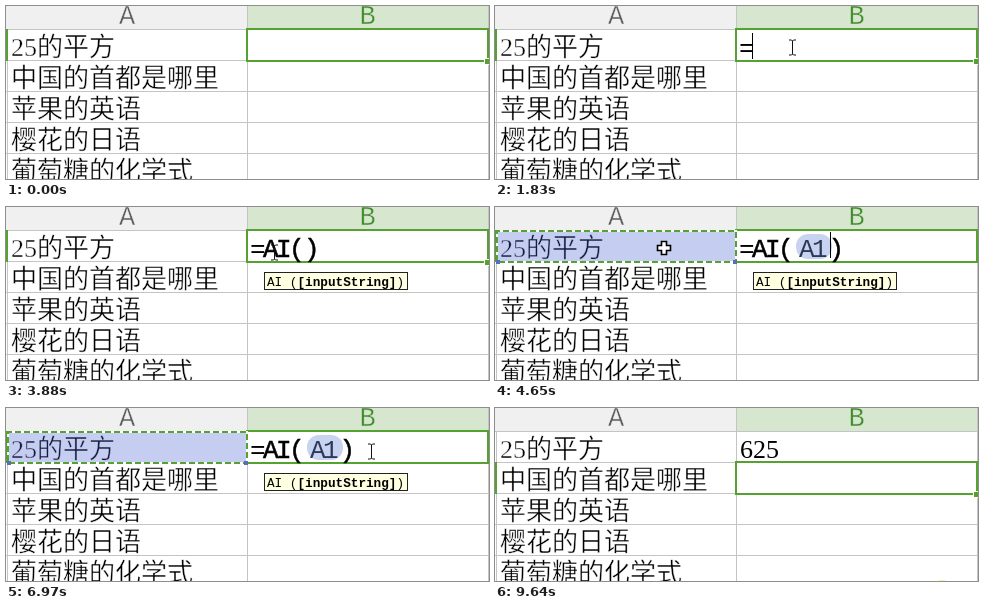
An HTML page that plays this animation: 483x173 px, repeating every 9.79 s.

```html
<!DOCTYPE html>
<html lang="zh-CN">
<head>
<meta charset="utf-8">
<title>表格 AI 函数</title>
<style>
  html, body { margin: 0; width: 100%; height: 100%; overflow: hidden; background: #fff; }
  svg { display: block; width: 483px; height: 173px; }
  text { white-space: pre; }
  .cell { font: 300 26px "Liberation Serif", "Noto Sans CJK SC", serif; fill: #000; }
  .thin { stroke: #fff; stroke-width: .45px; }
  .head { font: 27px "Liberation Mono", monospace; text-anchor: middle; stroke-width: .5px; }
  .code { font: 26px "Liberation Mono", monospace; letter-spacing: -2.6px; fill: #000; }
  .bold { stroke: #000; stroke-width: .5px; }
  .ref { fill: #2e3858; }
  .fx { font: italic bold 16px "Liberation Serif", serif; fill: #44546a; }
  .item { font: 14px "Liberation Mono", monospace; fill: #222; }
  .note { font: 12.2px "Open Sans", "Noto Sans CJK SC", sans-serif; fill: #111; }
  .hint { font: 12.7px "Liberation Mono", monospace; fill: #000; }
  .grid { stroke: #c4c4c4; fill: none; }
  .pick { stroke: #56a230; stroke-width: 2; fill: none; }
  .panel { fill: #fff; stroke: #b4b4b4; }
  .soft { filter: drop-shadow(1px 1px 2px #0005); }
  .caret { fill: #000; }
</style>
</head>
<body>
<svg viewBox="0 0 483 173">
  <rect width="483" height="173" fill="#fff"/>
  <rect width="241" height="23" fill="#f0f0f0"/>
  <rect x="241" width="242" height="23" fill="#d7e6cf"/>
  <text class="head" x="121" y="18" fill="#5c5c5c" stroke="#f0f0f0">A</text>
  <text class="head" x="361.5" y="18" fill="#3f8c2b" stroke="#d7e6cf">B</text>

  <g id="rows" class="cell thin"></g>
  <rect data-on="4330-8380" x="2" y="24" width="239" height="31" fill="#3f5fcd" fill-opacity=".3"/>
  <path class="grid" d="M0 23.5H483M0 54.5H483M0 85.5H483M0 116.5H483M0 147.5H483M241.5 0V173M482.5 0V173M1.5 24V173"/>

  <g id="box">
    <path class="pick" d="M1 23V55"/>
    <rect class="pick" x="241" y="23" width="241" height="32"/>
    <rect id="grip" x="478.5" y="52.5" width="6" height="6" fill="#56a230" stroke="#fff"/>
  </g>

  <g data-on="4330-8380">
    <rect x="2" y="24" width="239" height="31" fill="none" stroke="#fff" stroke-width="2"/>
    <rect id="ants" class="pick" x="2" y="24" width="239" height="31" stroke-dasharray="6 3"/>
    <path d="M1 53h4v4h-4zM238 53h4v4h-4z" fill="#5470b8"/>
  </g>

  <text class="code" data-on="1830-8380" x="244" y="50">=</text>
  <text class="code bold" data-on="2130-2280" x="257" y="50">a</text>
  <text class="code bold" data-on="2280-2780" x="257" y="50">ai</text>
  <text class="code bold" data-on="2780-8380" x="257" y="50">AI(</text>
  <text class="code bold" data-on="2780-4330" x="298" y="50">)</text>
  <g data-on="4330-8380">
    <rect x="301" y="27" width="36" height="25" rx="12" fill="#c8d2f1"/>
    <text class="code ref" x="304" y="50">A1</text>
    <text class="code bold" x="333.5" y="50">)</text>
  </g>
  <text class="cell" data-on="8380-9790" x="245" y="50">625</text>

  <g class="caret">
    <rect data-on="880-1350" x="244" y="28" width="1" height="25"/>
    <rect data-on="1830-2130" x="257" y="27" width="1" height="26"/>
    <rect data-on="2130-2280" x="271" y="27" width="1" height="26"/>
    <rect data-on="2280-2780" x="284" y="27" width="1" height="26"/>
    <rect data-on="2780-3250" x="299" y="27" width="1" height="26"/>
    <rect data-on="4330-4960" x="335" y="25" width="1" height="26"/>
  </g>

  <g data-on="2130-2280">
    <rect class="panel soft" x="258.5" y="55.5" width="116" height="130"/>
    <rect x="259" y="56" width="115" height="31" fill="#dfecd8"/>
    <g id="list"></g>
    <rect class="panel" x="377.5" y="56.5" width="130" height="30" rx="1"/>
    <text class="note" x="386" y="76">返回给定数字的绝对值</text>
  </g>

  <g data-on="2280-2780">
    <rect class="soft" x="258" y="55" width="68" height="33" fill="#dfecd8"/>
    <text class="fx" x="267" y="77">fx</text>
    <text class="item" x="291" y="78">AI</text>
    <rect class="panel" x="329.5" y="56.5" width="119" height="31" rx="1"/>
    <text class="note" x="340" y="76">qel-2.7-rapid(4k)</text>
  </g>

  <g data-on="2780-8230">
    <rect x="258.5" y="65.5" width="143" height="17" fill="#ffffe1" stroke="#222"/>
    <text class="hint" x="261" y="79">AI (<tspan font-weight="bold">[inputString]</tspan>)</text>
  </g>

  <ellipse data-on="9640-9790" cx="447" cy="174" rx="5" ry="2" fill="#f7f59a"/>

  <g id="beam">
    <path d="M-3.5 -7.5H-1L0 -6.5L1 -7.5H3.5M-3.5 7.5H-1L0 6.5L1 7.5H3.5M0 -6.5V6.5" transform="translate(.5 .5)" fill="none" stroke="#111"/>
  </g>
  <path id="plus" d="M-2.5 -6.5h5v4h4v5h-4v4h-5v-4h-4v-5h4z" fill="#fff" stroke="#000" stroke-width="1.6"/>
</svg>
<script>
const LOOP = 9790;
const $ = id => document.getElementById(id);
const show = (el, on) => { el.style.display = on ? '' : 'none'; };

const questions = ['25的平方', '中国的首都是哪里', '苹果的英语', '樱花的日语', '葡萄糖的化学式'];
$('rows').innerHTML = questions.map((q, i) => `<text x="5" y="${50 + 31 * i}">${q}</text>`).join('');

$('list').innerHTML = ['ABS', 'ACCRINT', 'ACCRINTM', 'ACOS'].map((name, i) =>
  `<text class="fx" x="267" y="${77 + 31 * i}">fx</text>
   <text class="item" x="291" y="${78 + 31 * i}">${name}</text>`).join('');

// Pointer path: time, shape, x, y
const path = [
  [0, ''],
  [100, 'plus', 348, 91], [250, 'plus', 337, 80], [400, 'plus', 320, 62],
  [550, 'plus', 305, 48], [700, 'plus', 298, 41], [880, 'beam', 297, 41],
  [3880, 'beam', 268, 45], [4030, 'plus', 216, 50], [4180, 'plus', 182, 45],
  [4330, 'plus', 169, 41], [4500, 'plus', 169, 41], [4650, 'plus', 169, 41],
  [4800, 'plus', 169, 41], [4960, 'plus', 192, 41], [5110, 'beam', 262, 42],
  [5260, 'beam', 312, 43], [5430, 'beam', 333, 43],
  [6970, 'beam', 365, 43], [7120, 'beam', 374, 58], [7290, 'beam', 391, 84],
  [7460, 'beam', 406, 104], [7610, 'beam', 412, 112],
  [8380, 'plus', 412, 112], [9160, 'plus', 427, 144], [9320, '']
];
const lastMarch = path.findIndex(p => p[0] === 5430);

const timed = [...document.querySelectorAll('[data-on]')].map(el => {
  const [from, to] = el.dataset.on.split('-').map(Number);
  return { el, from, to };
});

function draw(t) {
  for (const { el, from, to } of timed) show(el, t >= from && t < to);

  const step = path.findLastIndex(p => p[0] <= t);
  const [, shape, x, y] = path[step];
  for (const id of ['beam', 'plus']) {
    show($(id), id === shape);
    if (id === shape) $(id).setAttribute('transform', `translate(${x} ${y})`);
  }

  $('ants').setAttribute('stroke-dashoffset', -2 * Math.min(step, lastMarch));
  $('box').setAttribute('transform', `translate(0 ${t < 8380 ? 0 : 31})`);
  show($('grip'), t < 4330 || t >= 8380);
}

const start = performance.now();
function tick() {
  draw((performance.now() - start) % LOOP);
  requestAnimationFrame(tick);
}
tick();
</script>
</body>
</html>
```
